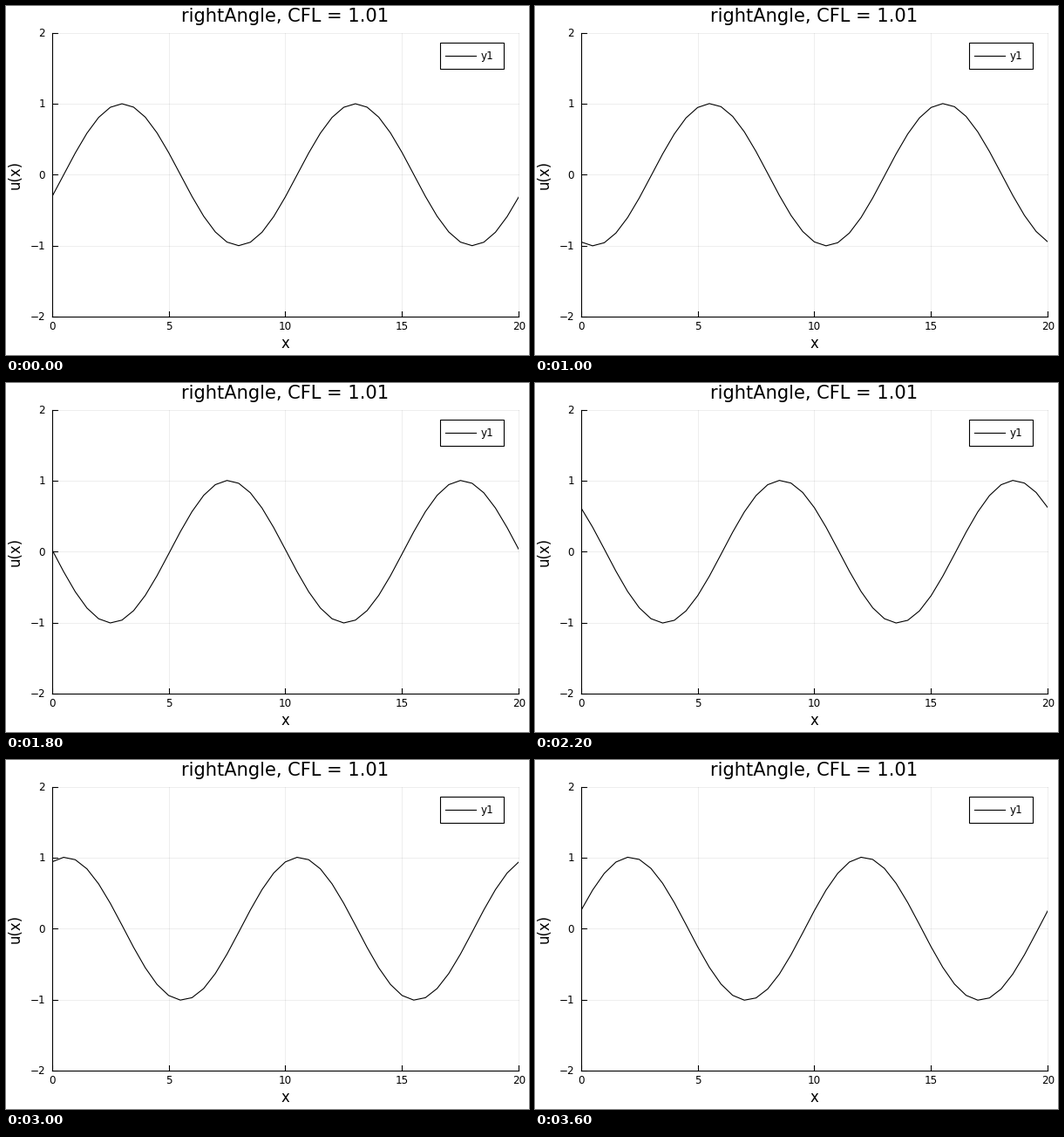
Animation, 600 px wide and 400 px high, one loop 3800 ms. Source, as a matplotlib script:

```python
import numpy as np
import matplotlib.pyplot as plt
from matplotlib.animation import FuncAnimation
from matplotlib.patches import Rectangle

W, H, DPI = 600, 400, 100
PX = 72 / DPI  # points per pixel
LEFT, RIGHT, TOP, BOTTOM = 52.7, 588.3, 30.8, 355.9
STEPS, INTERVAL = 19, 200
CFL, DX, PERIOD = 1.01, 0.5, 10

plt.rcParams["font.family"] = "DejaVu Sans"

fig = plt.figure(figsize=(W / DPI, H / DPI), dpi=DPI, facecolor="white")
ax = fig.add_axes([0, 0, 1, 1])
ax.set_xlim(0, W)
ax.set_ylim(H, 0)
ax.axis("off")


def to_x(x):
    return LEFT + (RIGHT - LEFT) * x / 20


def to_y(u):
    return BOTTOM - (BOTTOM - TOP) * (u + 2) / 4


def line(xs, ys, width=1.1, color="black", **kw):
    return ax.plot(xs, ys, lw=width * PX, color=color, **kw)[0]


def label(x, y, text, size, ha="center", **kw):
    ax.text(x, y, text, fontsize=size * PX, ha=ha, va="baseline",
            color="black", **kw)


# Grid, ticks and tick labels
for v in range(0, 21, 5):
    x = to_x(v)
    line([x, x], [TOP, BOTTOM], 1, alpha=0.065, zorder=1)
    line([x, x], [BOTTOM, BOTTOM - 6], zorder=4)
    label(x, 371.3, str(v), 12)
for v in range(-2, 3):
    y = to_y(v)
    line([LEFT, RIGHT], [y, y], 1, alpha=0.065, zorder=1)
    line([LEFT, LEFT + 6], [y, y], zorder=4)
    label(45.2, y + 4.4, str(v).replace("-", "\u2212"), 12, ha="right")

# Axes and titles
line([LEFT, LEFT], [TOP, BOTTOM], zorder=4)
line([LEFT, RIGHT], [BOTTOM, BOTTOM], zorder=4)
label(320.5, 18.3, f"rightAngle, CFL = {CFL}", 21)
label(320.5, 391.6, "x", 16.5)
label(16, 193.4, "u(x)", 16.5, rotation=90, rotation_mode="anchor")

# Legend
ax.add_patch(Rectangle((497.8, 41.7), 72.7, 30.2, facecolor="white",
                       edgecolor="black", lw=1.1 * PX, zorder=5))
line([503.5, 539.3], [56.8, 56.8], zorder=6)
label(545, 61.2, "y1", 12, ha="left", zorder=6)

# Upwind advection of a sine wave on a periodic grid: each step multiplies
# the mode by a fixed complex gain.
nodes = np.arange(41)
theta = 2 * np.pi * DX / PERIOD
gain = 1 - CFL + CFL * np.exp(-1j * theta)
wave = line([], [], zorder=3, solid_joinstyle="round")
wave.set_clip_path(Rectangle((LEFT, TOP), RIGHT - LEFT, BOTTOM - TOP,
                             transform=ax.transData))


def draw(step):
    u = (gain ** (step + 1) * np.exp(1j * theta * nodes)).imag
    wave.set_data(to_x(nodes * DX), to_y(u))
    return (wave,)


anim = FuncAnimation(fig, draw, frames=STEPS, interval=INTERVAL,
                     repeat=True, repeat_delay=0)
plt.show()
```
